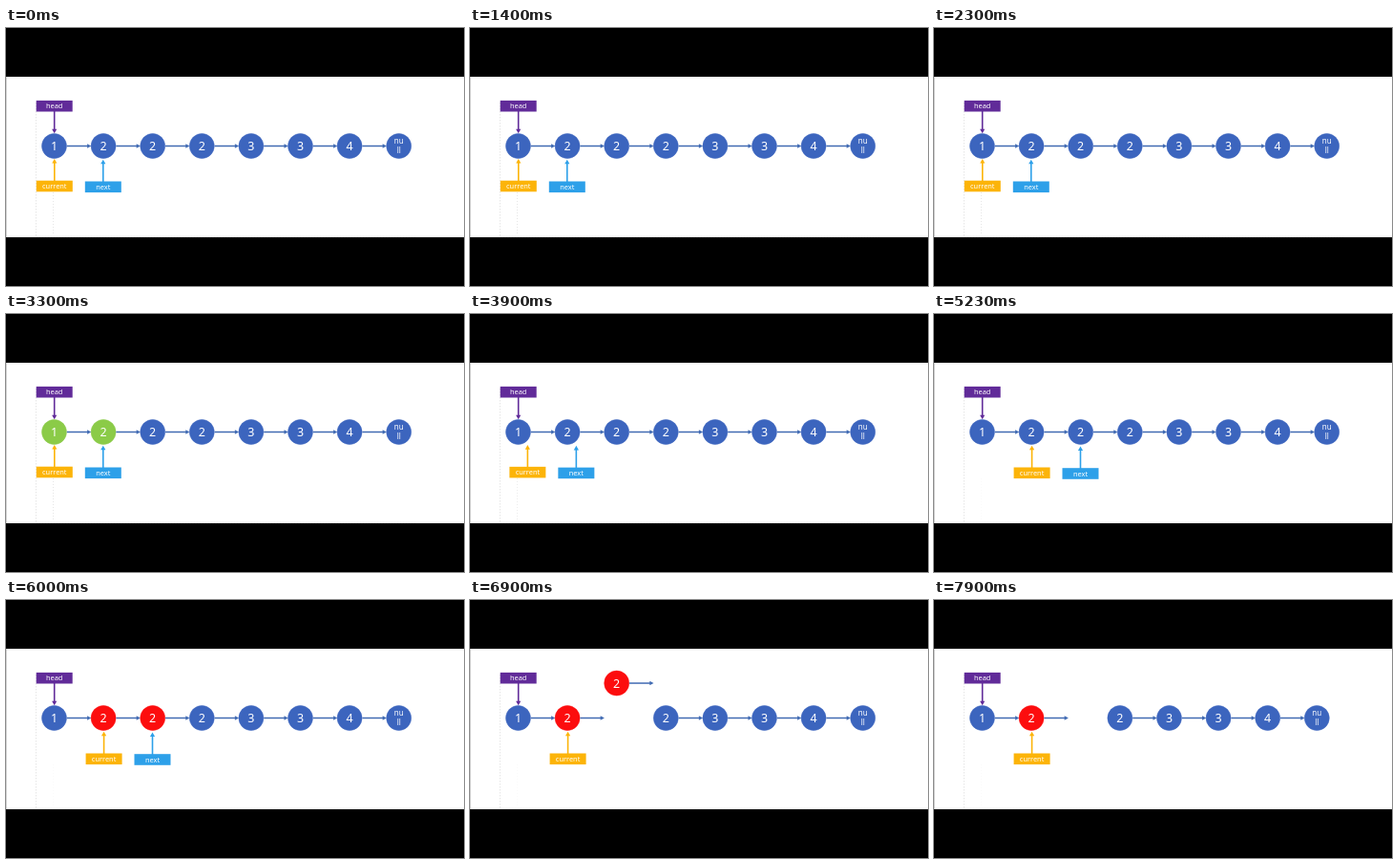
Recreate the animation shown at these times as an HTML page. Size 480 by 270 pixels, loop 8000 ms.

```html
<!DOCTYPE html>
<html lang="en">
<head>
<meta charset="utf-8">
<title>Linked list</title>
<style>
  html, body { margin: 0; width: 100%; height: 100%; overflow: hidden; background: #000; }
  svg { display: block; width: 100vw; height: 100vh; }
  text { fill: #fff; text-anchor: middle; font-family: "Noto Sans", "Open Sans", sans-serif; }
</style>
</head>
<body>
<svg id="stage" viewBox="0 0 480 270"></svg>
<script>
const LOOP = 8000;
const STEP = 51.6;
const ROW = 123.5;
const BLUE = [60, 101, 190];
const GREEN = [139, 203, 72];
const RED = [252, 13, 14];
const stage = document.getElementById('stage');

function add(parent, tag, attrs, text) {
  const el = document.createElementNS('http://www.w3.org/2000/svg', tag);
  for (const key in attrs) el.setAttribute(key, attrs[key]);
  if (text) el.textContent = text;
  parent.appendChild(el);
  return el;
}

function guide(d, dash) {
  return add(stage, 'path', { d, stroke: '#dcdcdc', 'stroke-width': 0.7, 'stroke-dasharray': dash, fill: 'none' });
}

function makeNode(label, i, all) {
  const g = add(stage, 'g', {});
  const disc = add(g, 'circle', { r: 13, stroke: '#345aa6', 'stroke-width': 0.5 });
  if (label === 'null') {
    add(g, 'text', { y: -2.2, 'font-size': 8 }, 'nu');
    add(g, 'text', { y: 7.5, 'font-size': 8 }, 'll');
  } else {
    add(g, 'text', { y: 4.6, 'font-size': 12.5 }, label);
  }
  if (i < all.length - 1) {
    add(g, 'path', { d: 'M13.3 0H36', stroke: '#416bb3', 'stroke-width': 1.5 });
    add(g, 'path', { d: 'M34.6 -2.3L38.8 0L34.6 2.3Z', fill: '#416bb3' });
  }
  return { g, disc, x: 50.5 + i * STEP };
}

// The origin of a tag is the centre of its box; dir is the side its arrow leaves from.
function makeTag(label, color, dir) {
  const g = add(stage, 'g', {});
  add(g, 'path', { d: `M0 ${dir * 5}V${dir * 26}`, stroke: color, 'stroke-width': 1.6 });
  add(g, 'path', { d: `M-2.6 ${dir * 24}H2.6L0 ${dir * 28.6}Z`, fill: color });
  const box = add(g, 'g', {});
  add(box, 'rect', { x: -19, y: -5.8, width: 38, height: 11.6, fill: color });
  add(box, 'text', { y: 2.6, 'font-size': 7.4 }, label);
  return g;
}

add(stage, 'rect', { y: 51, width: 480, height: 168, fill: '#fff' });
add(stage, 'rect', { y: 51, width: 0.7, height: 168, fill: '#c4c4c4' });
guide('M31.5 78V218', '1.5 1.5');
const oldGuides = [guide('M49.5 172V216', '1 2'), guide('M32 218.3H430', '1 2')];

const nodes = ['1', '2', '2', '2', '3', '3', '4', 'null'].map(makeNode);
const head = makeTag('head', '#612b99', 1);
const current = makeTag('current', '#fcb409', -1);
const next = makeTag('next', '#2da0e9', -1);

add(stage, 'rect', { width: 480, height: 51 });
add(stage, 'rect', { y: 219, width: 480, height: 51 });

const ramp = (t, from, to) => Math.min(1, Math.max(0, (t - from) / (to - from)));
const ease = (t, from, to) => {
  const p = ramp(t, from, to);
  return p * p * (3 - 2 * p);
};
const mix = (a, b, p) => `rgb(${a.map((v, i) => Math.round(v + (b[i] - v) * p))})`;
const place = (el, x, y) => el.setAttribute('transform', `translate(${x.toFixed(2)} ${y.toFixed(2)})`);

function draw(t) {
  const green = ramp(t, 2300, 2700) - ramp(t, 3450, 3800);
  const red = ramp(t, 5250, 5650);
  const advance = ease(t, 3750, 4300);
  const lift = 92 * ease(t, 6660, 7220);
  const close = STEP * ease(t, 7670, 8470);

  nodes.forEach((node, i) => {
    place(node.g, node.x - (i > 2 ? close : 0), ROW - (i === 2 ? lift : 0));
    let fill = mix(BLUE, GREEN, i < 2 ? green : 0);
    if (red && (i === 1 || i === 2)) fill = mix(BLUE, RED, red);
    node.disc.setAttribute('fill', fill);
    node.disc.setAttribute('stroke', fill);
  });

  place(head, 50.7, 81.7);
  place(current, 50.8 + 51.8 * advance, 165.5 + 0.8 * advance);
  place(next, 101.8 + 51.7 * advance, 166.3 + 0.7 * advance);
  next.setAttribute('opacity', 1 - ramp(t, 6350, 6600));
  oldGuides.forEach(el => el.setAttribute('opacity', 1 - 0.8 * ramp(t, 3750, 4200)));
}

const start = performance.now();
function tick() {
  draw((performance.now() - start) % LOOP);
  requestAnimationFrame(tick);
}
tick();
</script>
</body>
</html>
```
